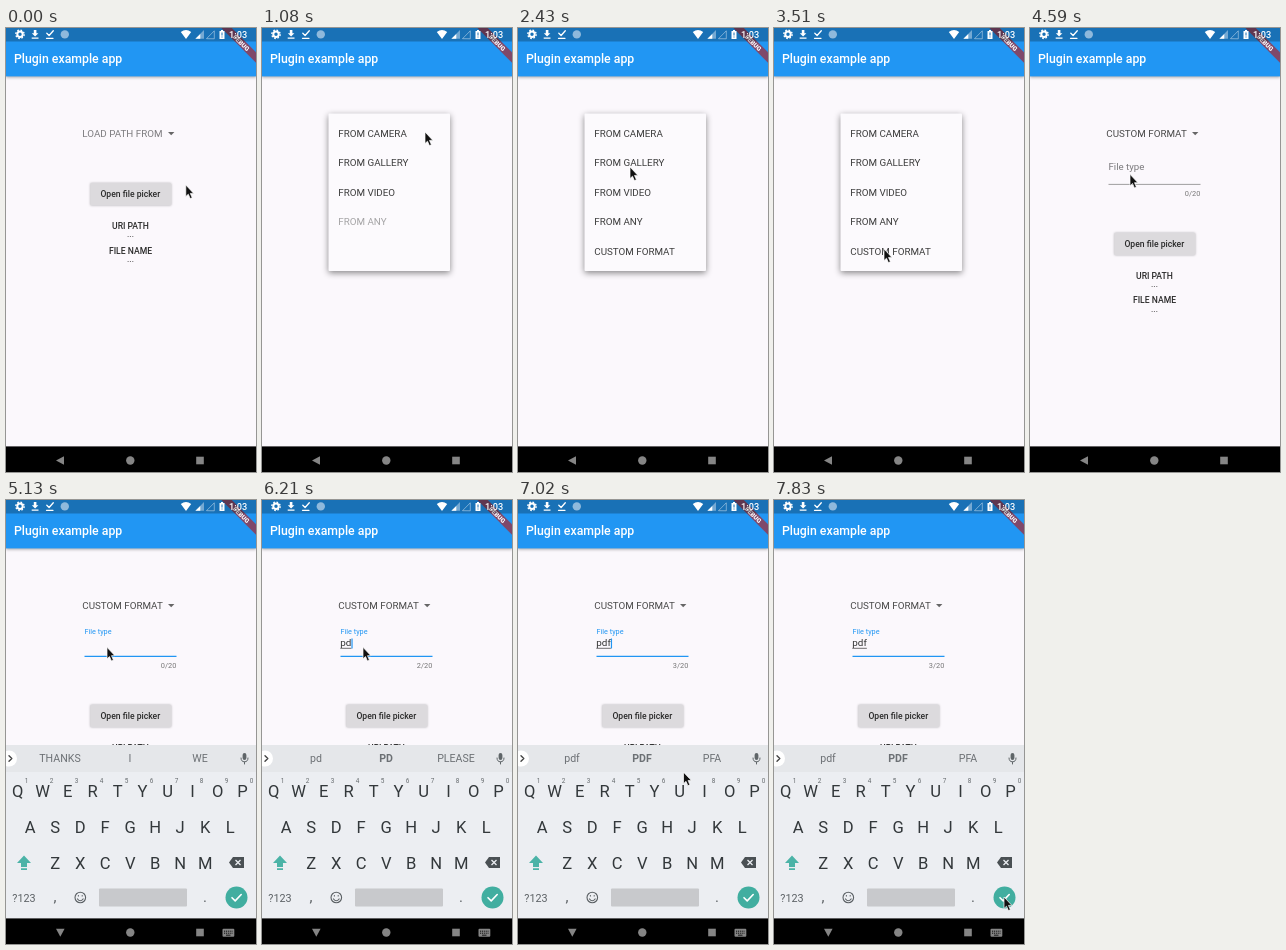
An HTML page that plays this animation: 250 px wide and 444 px high, repeating every 8 s.

```html
<!DOCTYPE html>
<html lang="en">
<head>
<meta charset="utf-8">
<style>
html, body { margin: 0; height: 100%; overflow: hidden; background: #fbf8fc; }
svg { display: block; width: 100vw; height: 100vh; font-family: Roboto, sans-serif; }
.mid { text-anchor: middle; }
.bold { font-weight: 500; }
.line { fill: none; stroke-linecap: round; stroke-linejoin: round; }
#menu rect { filter: drop-shadow(0 2px 3px #0007); }
#button rect { filter: drop-shadow(0 .5px .8px #0004); }
#appbar { filter: drop-shadow(0 1px 1.500px #0005); }
</style>
</head>
<body>
<svg viewBox="0 0 250 444" id="stage">
  <rect width="250" height="444" fill="#fbf8fc"/>

  <g id="page">
    <text id="choice" x="76.300" y="109" font-size="9.800"></text>
    <path d="M162 104h6.400l-3.200 3.200z" fill="#666"/>
    <g id="field">
      <text id="label" x="78.500"></text>
      <text id="typed" x="78.300" y="146.400" font-size="9.900" fill="#333"></text>
      <path id="compose" stroke="#333" stroke-width=".7"/>
      <path id="caret" stroke="#2196f3" stroke-width="1.200"/>
      <path id="rule" d="M78.500 156.400H170.500"/>
      <text id="count" x="170.300" y="168" font-size="7.400" fill="#777" text-anchor="end"></text>
    </g>
    <g id="lower" class="mid bold" font-size="8.600" fill="#2b2b2b">
      <g id="button">
        <rect x="84.300" y="155" width="81" height="22.500" rx="1.300" fill="#dcdadd"/>
        <text x="124.300" y="169">Open file picker</text>
      </g>
      <text x="124.500" y="201">URI PATH</text>
      <text x="124.500" y="209" font-weight="400">...</text>
      <text x="124.500" y="225.500">FILE NAME</text>
      <text x="124.500" y="234" font-weight="400">...</text>
    </g>
  </g>

  <g id="appbar"><rect width="250" height="48.400" fill="#2196f3"/></g>
  <text class="bold" x="8" y="35.200" font-size="12.300" fill="#fff">Plugin example app</text>

  <g id="menu">
    <rect x="66.500" y="85.500" width="121.500" height="157.500" rx="1" fill="#fcfafd"/>
  </g>

  <g transform="translate(250 0) rotate(45)">
    <rect x="-40" y="17.100" width="80" height="7.400" fill="#b71c1c" opacity=".63"/>
    <text class="mid" y="23.200" font-size="6.300" font-weight="900" fill="#fff">DEBUG</text>
  </g>
  <rect width="250" height="13.500" opacity=".25"/>
  <g id="status" fill="#fff">
    <circle cx="14" cy="6.300" r="2.700" fill="none" stroke="#fff" stroke-width="2"/>
    <circle cx="14" cy="6.300" r="4.200" fill="none" stroke="#fff" stroke-width="1.300" stroke-dasharray="1.650"/>
    <path d="M27.800 2h2.600v3.200h2l-3.300 3.300-3.300-3.300h2zM25.700 9.600h6.800v1.200h-6.800z"/>
    <path class="line" d="M40.800 5.200l2.300 2.300 4.200-4.800M40.500 10.300h6.500" stroke="#fff" stroke-width="1.300"/>
    <circle cx="58.800" cy="6.400" r="4.200" fill="#8fb9dc"/>
    <path d="M174.800 4q5.200-4 10.400 0l-5.200 7zM194.300 10.800V6l-4.900 4.800z"/>
    <path d="M198 10.800V2l-8.600 8.800z" opacity=".4"/>
    <path class="line" d="M208.300 10.400V2.800l-7.500 7.600z" stroke="#fff" stroke-width=".7" opacity=".6"/>
    <path d="M213.500 3h1.500v-1h2v1h1.500v8h-5z"/>
    <path d="M216 4.500v3M216 8.500v1" stroke="#1970b6"/>
    <text x="223" y="10.300" font-size="9.200" class="bold">1:03</text>
  </g>

  <g id="keys">
    <rect y="245" width="250" height="175" fill="#eceef2"/>
    <rect y="245" width="250" height="27" fill="#e5e7ea"/>
    <circle cx="3" cy="258.500" r="8" fill="#fff"/>
    <path class="line" d="M3 255.700l2.800 2.800L3 261.300" stroke="#444" stroke-width="1.400"/>
    <g id="hints" class="mid" font-size="10.600" fill="#6c7074"></g>
    <rect x="236.600" y="253" width="3.800" height="7" rx="1.900" fill="#5f6568"/>
    <path class="line" d="M235 258q0 3.800 3.500 3.800t3.500-3.800M238.500 262v2" stroke="#5f6568"/>
    <path d="M18 355.500l7 7.500h-4v4h-6v-4h-4zM15 368.200h6v1.800h-6z" fill="#4bb3a7"/>
    <path d="M223 362.500l4-5.500h11v11h-11z" fill="#4a5054"/>
    <path d="M229.500 360l5 5m0-5l-5 5" stroke="#eceef2" stroke-width="1.300"/>
    <g class="mid" fill="#5b6064" font-size="10.800">
      <text x="18" y="401.500">?123</text>
      <text x="49" y="402" font-size="15">,</text>
      <text x="199" y="402" font-size="15">.</text>
    </g>
    <circle cx="74.300" cy="397.500" r="5.300" fill="none" stroke="#5b6064" stroke-width="1.100"/>
    <path class="line" d="M71.500 399q2.800 3.500 5.600 0M72.400 395.700v.2M76.200 395.700v.2" stroke="#5b6064" stroke-width="1.200"/>
    <rect x="93" y="388.500" width="88" height="18" rx="1" fill="#c8c9cc"/>
    <circle cx="230.500" cy="397.500" r="11" fill="#41aea0"/>
    <path class="line" d="M226 397.700l3.200 3.200 6-6.400" stroke="#fff" stroke-width="1.600"/>
  </g>

  <rect y="418.400" width="250" height="26"/>
  <g fill="#858585">
    <path id="back" d="M50 432.500l8-4.300v8.600z"/>
    <circle cx="124.300" cy="432.500" r="4.200"/>
    <rect x="190.200" y="428.700" width="7.600" height="7.600"/>
    <g id="kbIcon">
      <rect x="216.500" y="428.700" width="11.800" height="8" rx="1"/>
      <path d="M218 431.200h8.500M218 433.200h8.500" stroke="#000" stroke-width=".9" stroke-dasharray="1.100 .8"/>
      <path d="M220 435.200h4.500" stroke="#000" stroke-width=".8"/>
    </g>
  </g>

  <path id="pointer" d="M0 0v11.500l2.500-2.300 1.900 4.400 2-.9-1.900-4.300h3.400z" fill="#111" stroke="#fff" stroke-width=".7"/>
</svg>
<script>
const $ = id => document.getElementById(id);
const set = (el, attrs) => { for (const k in attrs) el.setAttribute(k, attrs[k]); };
const show = (id, on) => set($(id), { visibility: on ? "visible" : "hidden" });
const clamp = v => Math.min(1, Math.max(0, v));

function addText(parent, text, attrs) {
  const el = document.createElementNS("http://www.w3.org/2000/svg", "text");
  el.textContent = text;
  set(el, attrs);
  return parent.appendChild(el);
}

const items = ["FROM CAMERA", "FROM GALLERY", "FROM VIDEO", "FROM ANY", "CUSTOM FORMAT"]
  .map((s, i) => addText($("menu"), s, { x: 76.3, y: 108.8 + 29.5 * i, "font-size": 9.8, fill: "#3b3b3b" }));

[["QWERTYUIOP", 11.6, 297], ["ASDFGHJKL", 24.2, 333], ["ZXCVBNM", 49.2, 369]].forEach(([row, x, y], r) =>
  [...row].forEach((c, i) => {
    const kx = x + 25 * i;
    addText($("keys"), c, { x: kx, y, class: "mid", "font-size": 16.6, fill: "#33383b" });
    if (!r) addText($("keys"), (i + 1) % 10, { x: kx + 9, y: 282.5, class: "mid", "font-size": 6.4, fill: "#666b6e" });
  }));

const hints = [54, 124, 194].map(x => addText($("hints"), "", { x, y: 262.3 }));
const hintSets = [["THANKS", "I", "WE"], ["p", "P", "PLEASE"], ["pd", "PD", "PLEASE"], ["pdf", "PDF", "PFA"]];

// time, x, y
const route = [[0, 179.8, 157], [810, 163, 104], [1080, 163, 104], [2430, 112, 139], [3240, 110, 221],
  [3780, 110, 221], [4590, 100, 146.3], [5130, 101, 147.3], [6480, 101, 147.3], [7560, 230, 397], [8000, 230, 397]];

function pointerAt(t) {
  const i = route.findIndex(p => p[0] > t);
  const [a, b] = [route[i - 1], route[i]];
  const u = (t - a[0]) / (b[0] - a[0]);
  return [a[1] + (b[1] - a[1]) * u, a[2] + (b[2] - a[2]) * u];
}

const OPEN = 822, PICK = 3780, FOCUS = 4860, STEP = 270;

function draw(now) {
  const t = Math.floor(now % 8000 / STEP) * STEP;
  const custom = t >= PICK, focus = t >= FOCUS;
  const n = [5670, 5940, 6480].filter(k => t >= k).length;

  $("choice").textContent = custom ? "CUSTOM FORMAT" : "LOAD PATH FROM";
  set($("choice"), { fill: custom ? "#484848" : "#7c7b7e" });
  set($("lower"), { transform: `translate(0 ${custom ? 49.7 : 0})` });

  set($("field"), { display: custom ? "inline" : "none" });
  $("label").textContent = "File type";
  set($("label"), focus ? { y: 134.4, "font-size": 7.3, fill: "#2196f3" } : { y: 141.8, "font-size": 9.7, fill: "#7c7b7e" });
  set($("rule"), focus ? { stroke: "#2196f3", "stroke-width": 1.3 } : { stroke: "#888", "stroke-width": .8 });
  $("typed").textContent = "pdf".slice(0, n);
  $("count").textContent = n + "/20";
  const end = 78.3 + (n ? $("typed").getComputedTextLength() : 0);
  set($("compose"), { d: `M78.3 148.300H${end}` });
  set($("caret"), { d: `M${end + .6} 138.500V148.500`, opacity: t >= 5400 && t % 1000 < 500 ? 1 : 0 });

  const p = (t - OPEN) / 300;
  show("menu", p > 0 && !custom);
  items.forEach((el, i) => set(el, { opacity: clamp((p - .5 - (i + 1) / 13) / (1.5 / 13)) }));

  const up = clamp((t - FOCUS + 180) / 300);
  show("keys", focus);
  set($("keys"), { transform: `translate(0 ${175 * (1 - up) ** 2})` });
  hints.forEach((el, i) => {
    el.textContent = hintSets[n][i];
    set(el, { "font-weight": n && i == 1 ? 700 : 400 });
  });
  show("kbIcon", focus);
  set($("back"), { transform: focus ? "rotate(-90 54.300 432.500)" : "" });

  set($("pointer"), { transform: `translate(${pointerAt(t)})` });
}

const start = performance.now();
function frame() {
  draw(performance.now() - start);
  requestAnimationFrame(frame);
}
frame();
</script>
</body>
</html>
```
